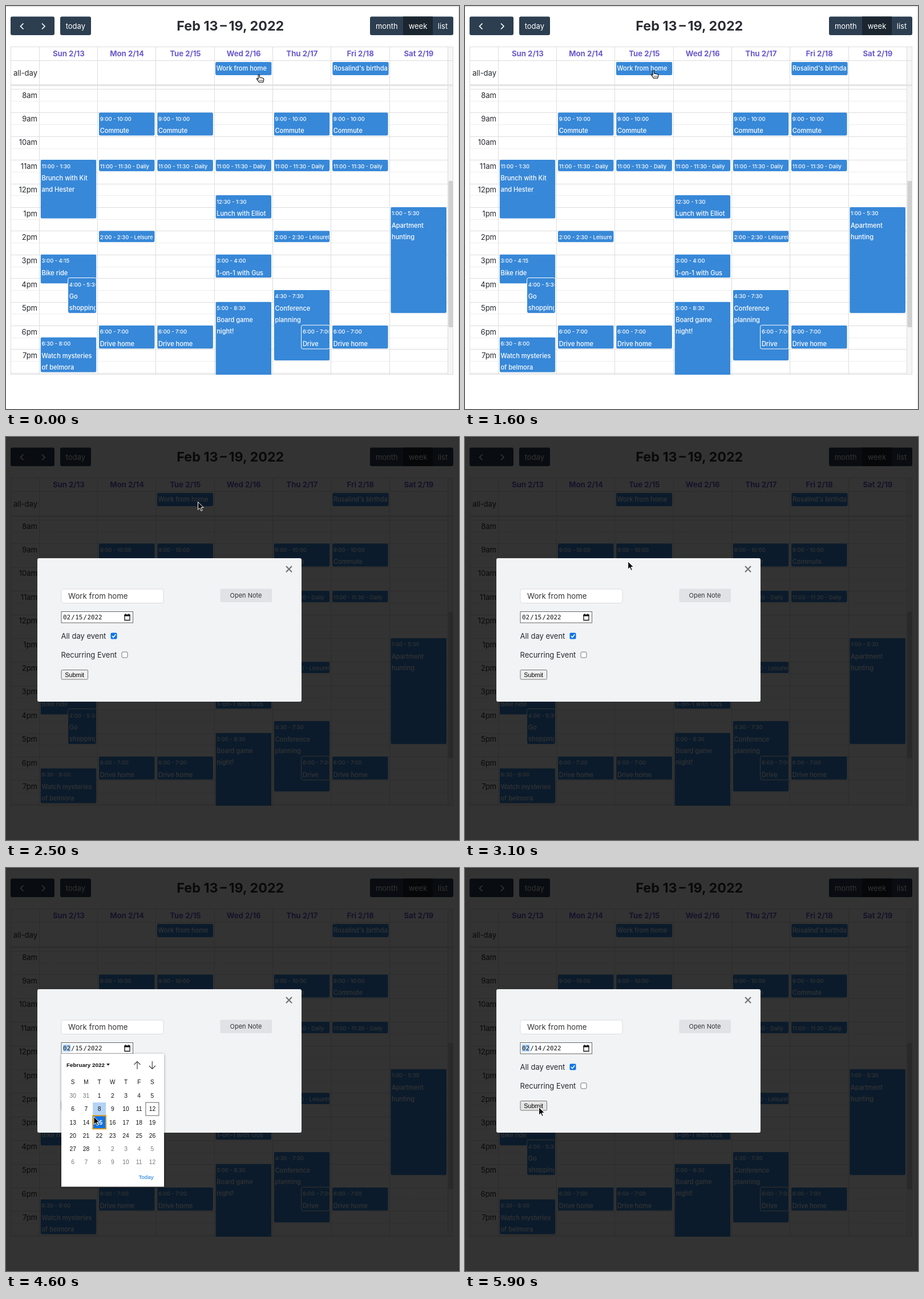
Recreate the animation shown at these times as an HTML page. Size 794 px wide and 705 px high, loop 6.1 s.

```html
<!DOCTYPE html>
<html lang="en">
<head>
<meta charset="utf-8">
<title>Week calendar</title>
<style>
  html, body { margin: 0; width: 100%; height: 100%; overflow: hidden; background: #fff; }
  svg { display: block; }
  text { font-family: Inter, "Open Sans", sans-serif; white-space: pre; }
  .sans { font-family: "Liberation Sans", Arial, sans-serif; }
  .mono { font-family: "DejaVu Sans Mono", monospace; }
</style>
</head>
<body>
<svg id="stage" width="794" height="705" viewBox="0 0 794 705"></svg>
<script>
const LOOP = 6100, STEP = 100;
const LEFT = 59, COL = 102.27, HOUR = 41.4, BLUE = '#3788d8', INK = '#26282d';
const colX = i => LEFT + i * COL;
const colLine = i => Math.floor(colX(i) - .6);
const hourY = h => 145 + (h - 8) * HOUR;

const rect = (x, y, w, h, fill, extra = '') =>
  `<rect x="${x}" y="${y}" width="${w}" height="${h}" fill="${fill}" ${extra}/>`;
const text = (x, y, str, size, fill = INK, extra = '') =>
  `<text x="${x}" y="${y}" font-size="${size}" fill="${fill}" ${extra}>${str}</text>`;
const path = (d, stroke, width = 1, extra = '') =>
  `<path d="${d}" fill="none" stroke="${stroke}" stroke-width="${width}" ${extra}/>`;
const MID = 'text-anchor="middle"', END = 'text-anchor="end"';

// A rounded box that clips its own text
function card(x, y, w, h, lines, inset) {
  const body = lines.map(([str, size, base]) =>
    text(1.8, base, str, size, '#fff', 'font-weight="500"')).join('');
  const rim = inset ? rect(x - .5, y - .5, w + 1, h + 1, 'none', 'rx="3" stroke="#fff"') : '';
  return `<svg x="${x}" y="${y}" width="${w}" height="${h}">` +
    rect(0, 0, w, h, BLUE, 'rx="3"') +
    `<svg width="${w - 1.5}" height="${h}">${body}</svg></svg>` + rim;
}

function timed(day, from, to, time, title, inset) {
  const x = colX(day) + 1.6 + (inset ? 48.4 : 0);
  const y = hourY(from) - .2, h = (to - from) * HOUR - .8;
  const lines = to - from < .6
    ? [[`${time} - ${title}`, 9.4, 14.6]]
    : [[time, 9.4, 14.7], ...title.split('|').map((s, i) => [s, 11.05, 36 + i * 20])];
  return card(x, y, inset ? 49 : 97.8, h, lines, inset);
}

const allDay = (x, y, title) => card(x, y, 98.6, 23.4, [[title, 11.05, 15.5]]);

function toolbar() {
  const dark = '#2c3e50';
  const label = (x, s) => text(x, 39.7, s, 13, '#fff', MID);
  return rect(8, 18.5, 77, 32.5, dark, 'rx="3"') +
    rect(95, 18.5, 54, 32.5, dark, 'rx="3"') +
    rect(638, 18.5, 146, 32.5, dark, 'rx="3"') +
    rect(696, 18.5, 52, 32.5, '#1a252f') +
    path('M30.5 30.5L25.5 35.5L30.5 40.5M63 30.5L68 35.5L63 40.5', '#fff', 1.7) +
    label(121.8, 'today') + label(667.3, 'month') + label(722, 'week') + label(765.5, 'list') +
    text(393.3, 43, 'Feb 13\u2009–\u200919, 2022', 23.3, '#2b2d33', `${MID} font-weight="700"`);
}

function grid() {
  let out = rect(775, 71, 9, 66, '#f7f7f7') + rect(8, 137, 776, 3, '#f1f1f1') +
    rect(775, 140, 9, 505, '#f5f5f5');
  let lines = 'M8.5 71V645M783.5 71V645M8 71.5H784M8 95.5H784M8 137.5H784M8 139.5H784M8 644.5H784';
  let dots = '';
  for (let i = 0; i < 8; i++) lines += `M${colLine(i) + .5} 71V645`;
  for (let h = 8; h <= 20; h++) {
    lines += `M8 ${Math.round(hourY(h)) + .5}H775`;
    if (h === 20) break;
    dots += `M8 ${Math.round(hourY(h + .5)) + .5}H775`;
    out += text(55, hourY(h) + 15.6, (h > 12 ? h - 12 : h) + (h < 12 ? 'am' : 'pm'), 13, INK, END);
  }
  out += path(lines, '#ddd') + path(dots, '#ddd', 1, 'stroke-dasharray="1 1"');
  'Sun Mon Tue Wed Thu Fri Sat'.split(' ').forEach((d, i) => {
    out += text(colX(i + .5) - .3, 88.3, `${d} 2/${13 + i}`, 13.2, '#6a5acd', `${MID} font-weight="700"`);
  });
  return out + text(55, 121.5, 'all-day', 13, INK, END) +
    rect(775.5, 306, 8, 256, '#d0d0d0', 'rx="2"');
}

function events() {
  let out = '';
  for (const d of [1, 2, 4, 5]) out += timed(d, 9, 10, '9:00 - 10:00', 'Commute');
  for (let d = 1; d < 6; d++) out += timed(d, 11, 11.5, '11:00 - 11:30', 'Daily');
  for (const d of [1, 2, 5]) out += timed(d, 18, 19, '6:00 - 7:00', 'Drive home');
  out += timed(1, 14, 14.5, '2:00 - 2:30', 'Leisure') +
    timed(4, 14, 14.5, '2:00 - 2:30', 'Leisurely') +
    timed(0, 11, 13.5, '11:00 - 1:30', 'Brunch with Kit|and Hester') +
    timed(0, 15, 16.25, '3:00 - 4:15', 'Bike ride') +
    timed(0, 16, 17.5, '4:00 - 5:30', 'Go|shopping', true) +
    timed(0, 18.5, 20, '6:30 - 8:00', 'Watch mysteries|of belmora') +
    timed(3, 12.5, 13.5, '12:30 - 1:30', 'Lunch with Elliot') +
    timed(3, 15, 16, '3:00 - 4:00', '1-on-1 with Gus') +
    timed(3, 17, 20.5, '5:00 - 8:30', 'Board game|night!') +
    timed(4, 16.5, 19.5, '4:30 - 7:30', 'Conference|planning') +
    timed(4, 18, 19, '6:00 - 7:00', 'Drive', true) +
    timed(6, 13, 17.5, '1:00 - 5:30', 'Apartment|hunting');
  return `<svg width="794" height="645">${out}</svg>` + allDay(572.2, 97.7, 'Rosalind\'s birthda');
}

function modal() {
  const edge = 'stroke="#767676"';
  return rect(0, 0, 794, 705, '#000', 'opacity=".8"') +
    rect(55, 212, 463, 251, '#f1f3f5', 'rx="3"') +
    path('M491 226L501 236.2M501 226L491 236.2', '#777', 2.3) +
    rect(97, 266, 179, 24.5, '#fff', 'rx="3.5" stroke="#dadcdf"') +
    text(109, 283, 'Work from home', 13.25, '#333') +
    rect(375.5, 265.5, 90.5, 23.5, '#e0e2e6', 'rx="2"') +
    text(420.5, 281.3, 'Open Note', 11, '#333', MID) +
    rect(97, 305.5, 125.5, 19.5, '#fff', 'stroke="#666"') +
    rect(99.5, 308.5, 14, 13, '#b3d7ff', 'id="month"') +
    [[100, '02'], [114.2, '/'], [121.2, ''], [135.5, '/'], [142.5, '2022']].map(([x, s]) =>
      text(x, 319, s, 10.8, '#111', `class="mono"${s ? '' : ' id="day"'}`)).join('') +
    path('M208 311.5H217V320.5H208Z', '#111', 1.3) + rect(207.5, 310.5, 10, 3, '#111') +
    path('M209.7 309V311M215.3 309V311', '#111', 1.3) +
    text(96.5, 353, 'All day event', 13) +
    rect(183.5, 342.5, 11, 11, '#0b74ea', 'rx="2"') +
    path('M186 348.2L188.3 350.5L192.2 345.2', '#fff', 1.7) +
    text(96.5, 386, 'Recurring Event', 13) +
    rect(203, 376, 10, 10, '#fff', `rx="2" ${edge}`) +
    rect(97, 407.5, 46.5, 16.5, '#efefef', `id="submit" rx="1.5" ${edge}`) +
    text(120.2, 419.6, 'Submit', 10.85, '#000', `class="sans" ${MID}`);
}

// Month popup: the grid starts on January 30
function picker(selected, hover) {
  const cx = i => 117.2 + (i % 7) * 23.2, cy = i => 398.5 + Math.floor(i / 7) * 23.15;
  const cell = (day, fill, extra) => rect(cx(day + 1) - 11.5, cy(day + 1) - 11.5, 23, 23, fill, extra);
  const sans = 'class="sans" ';
  let out = rect(97, 325, 180, 232.5, '#fff', 'filter="url(#shade)"') +
    text(106, 347.5, 'February 2022', 9.9, '#111', sans + 'font-weight="700"') +
    '<path d="M176 342.3H182L179 345.8Z" fill="#111"/>' +
    path('M230 352V338.5M224.5 344L230 338.5L235.5 344M256.3 338V351.5M250.8 346L256.3 351.5L261.8 346', '#444', 1.2);
  if (hover) out += cell(hover, '#b3d3f5');
  out += cell(selected, '#0b74ea', 'stroke="#e09a1c" stroke-width="2"') +
    cell(12, 'none', 'stroke="#666"');
  [...'SMTWTFS'].forEach((s, i) => out += text(cx(i), 378, s, 10, '#111', sans + MID));
  for (let i = 0; i < 42; i++) {
    const day = i - 1, inside = day > 0 && day < 29, on = day === selected;
    const label = day < 1 ? day + 31 : inside ? day : day - 28;
    out += text(cx(i), cy(i) + 3.7, label, 10.3, on ? '#fff' : inside ? '#111' : '#777',
      sans + MID + (on ? ' font-weight="700"' : ''));
  }
  return out + text(245.5, 543.7, 'Today', 9.75, '#0b74d8', sans + MID);
}

const arrow = '<path d="M0 0V13.6L3.2 10.7L5.5 15.8L7.6 14.9L5.4 9.9H9.7Z" fill="#000" stroke="#fff" stroke-width="1" stroke-linejoin="round"/>';
const hand = '<path d="M-1.3 8V1.2C-1.3 -.4 1 -.4 1 1.2V5L7 6.2C8.2 6.5 8.5 7.5 8.3 8.8L7.3 13.2H-.3C-1 11 -3 9 -4 7.6C-4.3 6.2 -2.8 6 -1.3 8Z" fill="#fff" stroke="#000" stroke-width="1.1" stroke-linejoin="round"/>' +
  path('M1.3 9V11.5M3.5 9V11.5M5.6 9V11.5', '#000', .8);

const stage = document.getElementById('stage');
stage.innerHTML =
  `<defs><filter id="shade" x="-10%" y="-10%" width="120%" height="120%">
    <feDropShadow dx="0" dy="1" stdDeviation="2" flood-opacity=".4"/></filter></defs>` +
  rect(0, 0, 794, 705, '#fff') +
  rect(0, 0, 794, 1.5, '#ddd') + rect(792.5, 0, 1.2, 705, '#ddd') +
  rect(0, 96, COL, 41, '#eaf7fb', 'id="drop"') +
  toolbar() + grid() + events() +
  `<g id="work">${allDay(0, 0, 'Work from home')}</g>` +
  `<g id="modal">${modal()}</g><g id="picker"></g>` +
  `<g id="arrow">${arrow}</g><g id="hand">${hand}</g>`;

const $ = id => document.getElementById(id);
const show = (id, on) => $(id).setAttribute('display', on ? 'inline' : 'none');
const move = (id, x, y) => $(id).setAttribute('transform', `translate(${x} ${y})`);

// Pointer stops: step, x, y
const stops = [
  [0, 443.5, 120], [1, 450, 122], [3, 560, 137], [4, 596, 138], [5, 540, 132], [7, 350, 115],
  [9, 350, 115], [13, 338, 114], [14, 338, 114], [16, 330.5, 113], [17, 330, 111], [24, 330, 111],
  [26, 343, 116], [28, 343, 116], [31, 285.7, 217.7], [33, 214, 314], [34, 214, 314], [36, 188, 334],
  [38, 214, 316], [43, 214, 316], [46, 154, 435], [48, 145, 439], [52, 145, 439],
  [57, 128, 418], [59, 129.6, 418.5], [61, 129.6, 418.5]
];

function pointer(n) {
  const i = stops.findIndex(s => s[0] > n);
  const [a, ax, ay] = stops[i - 1], [b, bx, by] = stops[i];
  const k = (n - a) / (b - a);
  return [ax + (bx - ax) * k, ay + (by - ay) * k];
}

function draw(n) {
  const [x, y] = pointer(n);
  const dragging = n >= 1 && n < 10, isHand = n === 0 || (n >= 10 && n < 17);
  const open = n >= 40 && n < 52, picked = n >= 51 ? 14 : 15;

  show('arrow', !isHand);
  show('hand', isHand);
  move(isHand ? 'hand' : 'arrow', x, y);

  show('drop', dragging);
  $('drop').setAttribute('x', colLine(Math.floor((x - LEFT) / COL)) + 1);
  $('work').setAttribute('opacity', dragging ? .75 : 1);
  if (dragging) {
    const [gx, gy] = pointer(Math.min(n, 4));
    move('work', gx - 77, gy - 23);
  } else move('work', colX(n ? 2 : 3) + 1.2, 97.7);

  show('modal', n >= 17);
  show('month', n >= 40);
  $('day').textContent = picked;
  $('submit').setAttribute('fill', n >= 55 ? '#e5e5e5' : '#efefef');
  const hover = { 45: 1, 46: 8, 47: 15 }[n] || (n >= 48 ? 14 : 0);
  $('picker').innerHTML = open ? picker(picked, hover) : '';
}

let last = -1;
const start = performance.now();
function tick() {
  const n = Math.floor((performance.now() - start) % LOOP / STEP);
  if (n !== last) draw(last = n);
  requestAnimationFrame(tick);
}
tick();
</script>
</body>
</html>
```
